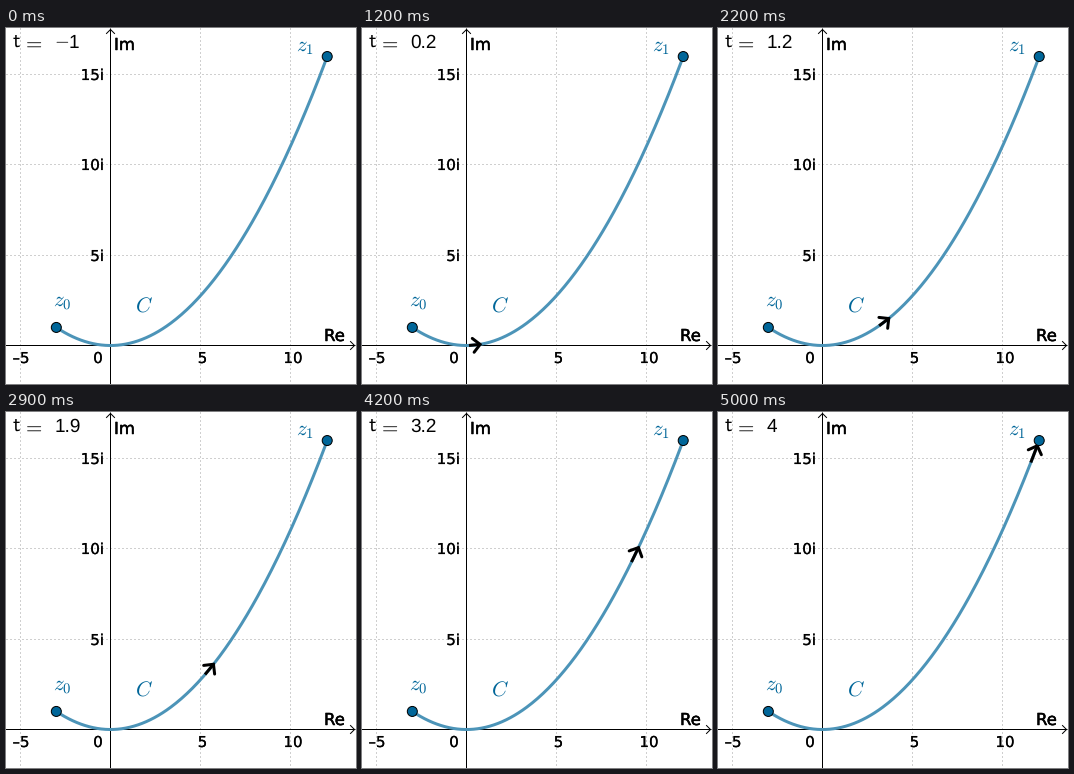
Recreate the animation shown at these times as a matplotlib script. Size 350 px wide and 356 px high, loop 5100 ms.

```python
import numpy as np
import matplotlib.pyplot as plt
from matplotlib.animation import FuncAnimation
from matplotlib.patches import Circle
from matplotlib.patheffects import withStroke

W, H, DPI = 350, 356, 100
FRAMES, INTERVAL = 51, 100
PX = 72 / DPI                      # one pixel in points
UNIT = 18.06                       # pixels per unit
OX, OY = 104.5, 317.5              # origin on the stage
BLUE = "#006699"
CURVE = "#4c94b8"

plt.rcParams["font.family"] = "DejaVu Sans"
plt.rcParams["mathtext.fontset"] = "cm"
plt.rcParams["text.hinting"] = "none"

fig = plt.figure(figsize=(W / DPI, H / DPI), dpi=DPI, facecolor="white")
ax = fig.add_axes([0, 0, 1, 1])
ax.set_xlim(0, W)
ax.set_ylim(H, 0)
ax.axis("off")


def path(t):
    """Stage position of z(t) = 3t + i t^2."""
    return np.array([OX + 3 * t * UNIT, OY - t * t * UNIT])


def line(xs, ys, width=1, color="black", z=2, **kw):
    return ax.plot(xs, ys, color=color, lw=width * PX, zorder=z,
                   snap=False, **kw)[0]


def label(x, y, s, size=15, color="black", ha="left", bold=0, **kw):
    """Text on a baseline; bold thickens the strokes by some pixels."""
    txt = ax.text(x, y, s, fontsize=size * PX, color=color, ha=ha,
                  va="baseline", zorder=6, **kw)
    if bold:
        txt.set_path_effects([withStroke(linewidth=bold * PX, foreground=color)])
    return txt


# grid
dash = dict(color="#cfcfcf", z=0, dashes=(2, 2), dash_capstyle="butt")
for x in (14.5, 194.5, 284.5):
    line([x, x], [0, H], **dash)
for y in (46.5, 136.5, 227.5):
    line([0, W], [y, y], **dash)

# axes with open arrowheads
line([OX, OX], [1, H])
line([0, W - 1], [OY, OY])
line([OX - 4, OX, OX + 4], [5.5, 1.5, 5.5])
line([W - 5.5, W - 1.5, W - 5.5], [OY - 4, OY, OY + 4])

# axis labels
for x, s in ((15, "\u20135"), (92, "0"), (196.5, "5"), (287, "10")):
    label(x, 335, s, ha="center", bold=0.2)
for y, s in ((52, "15i"), (142, "10i"), (233, "5i")):
    label(98, y, s, ha="right", bold=0.2)
label(108, 22, "Im", 16.5, bold=0.5)
label(318, 313, "Re", 16.5, bold=0.5)

# curve and its end points
line(*path(np.linspace(-1, 4, 200)), width=3, color=CURVE, z=3)
for t in (-1, 4):
    ax.add_patch(Circle(path(t), 5, fc=BLUE, ec="black", lw=PX, zorder=5))
label(47, 278.5, "$z_0$", 21, BLUE)
label(289.5, 22.5, "$z_1$", 21, BLUE)
label(129, 285, "$C$", 21, BLUE)

# readout
label(5.5, 20, r"$\mathsf{t}$", 21)
label(26.8, 20, "$=$", 21, ha="center")
value = label(48.5, 20, "", 19, family="Liberation Sans")

# moving arrow
shaft = line([], [], 3, z=4, solid_capstyle="butt")
head = line([], [], 3, z=4, solid_capstyle="round", solid_joinstyle="miter")


def update(i):
    t = round(-1 + 0.1 * i, 1)
    sign = "$-$" if t < 0 else ""
    value.set_text(f"{sign}{abs(t):g}")

    vel = UNIT * np.array([3, -2 * t])
    speed = np.hypot(*vel)
    d = vel / speed
    n = np.array([-d[1], d[0]])
    tip = path(t) + d * (7.4 - 0.084 * speed)
    back = tip - 7 * d
    head.set_data(*np.array([back + 7 * n, tip, back - 7 * n]).T)
    shaft.set_data(*np.array([path(t - 0.155), tip]).T)
    for part in (shaft, head):
        part.set_visible(i > 0)
    return value, shaft, head


anim = FuncAnimation(fig, update, frames=FRAMES, interval=INTERVAL,
                     repeat=True, repeat_delay=0, blit=False)
plt.show()
```
